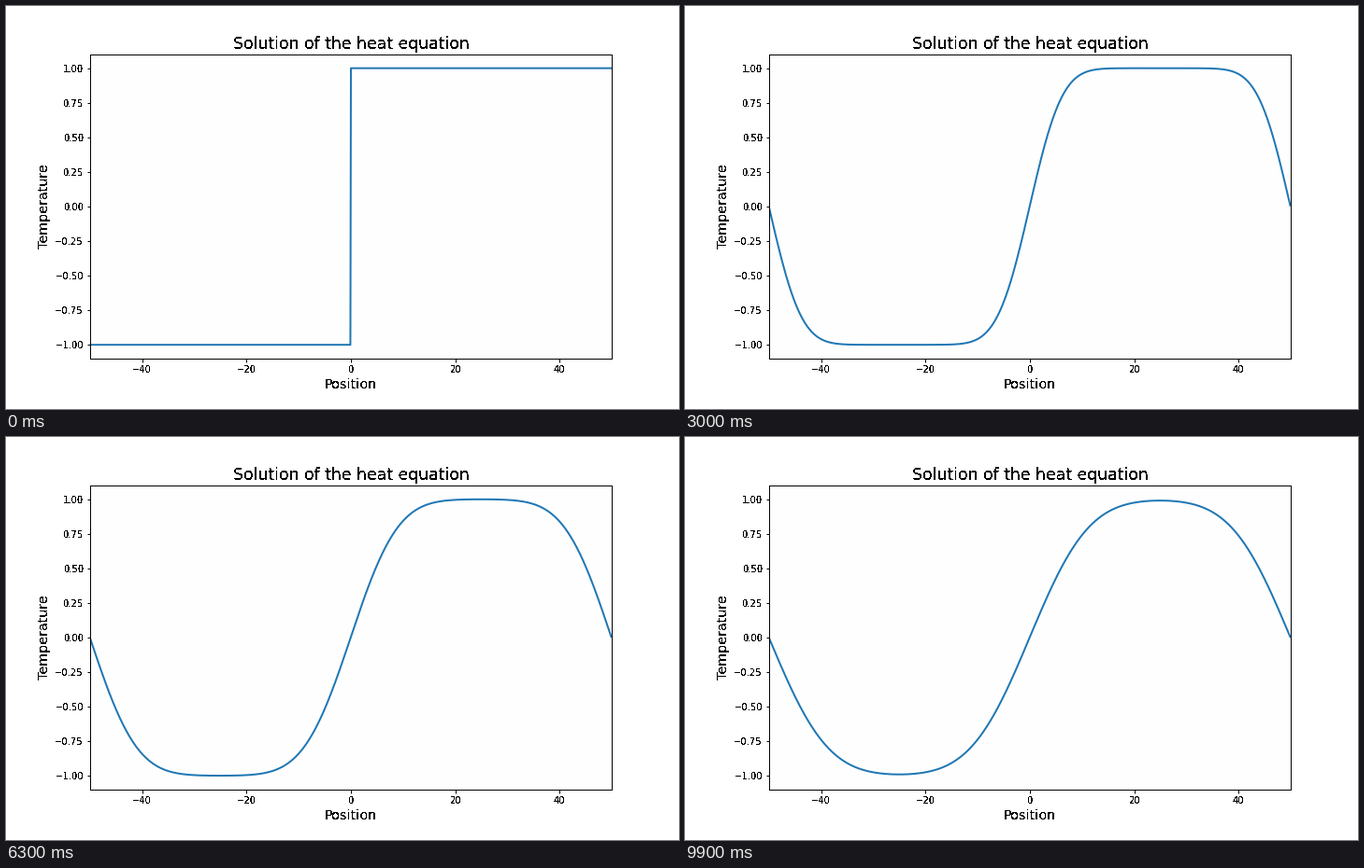
A matplotlib script that plays this animation: 720 by 432 pixels, repeating every 10 s.

```python
import numpy as np
import matplotlib.pyplot as plt
from matplotlib.animation import FuncAnimation

FRAMES, INTERVAL = 100, 100
LENGTH, N = 100.0, 1000
DIFFUSION = 0.4  # per animation step

plt.rcParams.update({
    "font.family": "DejaVu Sans",
    "font.size": 10,
    "axes.linewidth": 1.0,
    "xtick.major.width": 1.0,
    "ytick.major.width": 1.0,
})

x = -LENGTH / 2 + np.arange(N) * LENGTH / N
u0 = np.where(np.arange(N) < N // 2, -1.0, 1.0)
u0_hat = np.fft.rfft(u0)
k = 2 * np.pi * np.fft.rfftfreq(N, LENGTH / N)


def temperature(step):
    """Exact periodic solution of the heat equation."""
    if step == 0:
        return u0
    return np.fft.irfft(u0_hat * np.exp(-DIFFUSION * step * k**2), N)


def harden(image, dpi):
    """Give text hard, unblended edges."""
    image = image.copy()
    image[..., :3] = 0
    image[..., 3] = image[..., 3] > 0.35
    return image, 0, 0


fig, ax = plt.subplots(figsize=(10, 6), dpi=72, facecolor="white")
fig.subplots_adjust(left=0.125, right=0.9, bottom=0.125, top=0.88)
ax.set_facecolor("#fefefe")
ax.set_xlim(-50, 50)
ax.set_ylim(-1.1, 1.1)
ax.set_xticks(np.arange(-40, 41, 20))
ax.set_yticks(np.arange(-1, 1.01, 0.25))
ax.set_title("Solution of the heat equation", fontsize="xx-large")
ax.set_xlabel("Position", fontsize="x-large")
ax.set_ylabel("Temperature", fontsize="x-large")

labels = [ax.title, ax.xaxis.label, ax.yaxis.label]
for text in labels + ax.get_xticklabels() + ax.get_yticklabels():
    text.set_agg_filter(harden)

line, = ax.plot(x, u0, color="#1f77b4", lw=2)


def update(step):
    line.set_ydata(temperature(step))
    return line,


anim = FuncAnimation(fig, update, frames=FRAMES, interval=INTERVAL,
                     repeat=True, repeat_delay=0, blit=False)
plt.show()
```
